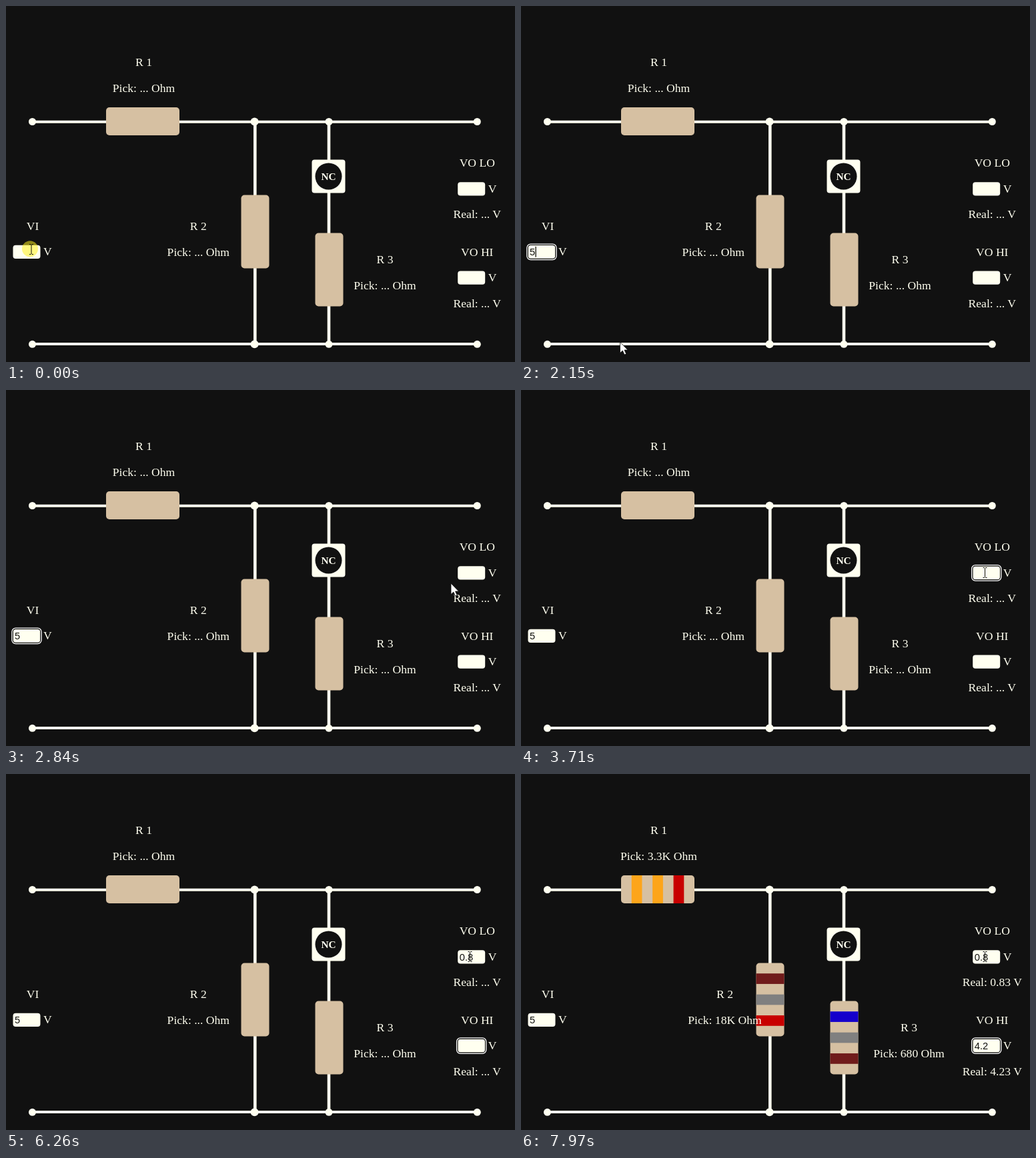
Write an HTML page that moves like this. It is 763 px wide and 534 px high and loops after 8000 ms.

```html
<!DOCTYPE html>
<html lang="en">
<head>
<meta charset="utf-8">
<title>Voltage divider calculator</title>
<style>
html, body { margin: 0; width: 100%; height: 100%; overflow: hidden; background: #111; }
svg { display: block; width: 763px; height: 534px; }
text { font: 17.6px "Liberation Serif", "Times New Roman", serif; fill: #fffff0; }
.mid { text-anchor: middle; }
.nc { font-size: 15.4px; font-weight: bold; text-anchor: middle; }
.val { font: 14.67px "Liberation Sans", Arial, sans-serif; fill: #111; }
</style>
</head>
<body>
<svg id="stage" viewBox="0 0 763 534"></svg>
<script>
const LOOP = 8000, BLINK = 510, IVORY = '#fffff0', TAN = '#d6c0a2';
const green = '#1b7f12', blue = '#1500cc', orange = '#fda51a',
      red = '#c80000', brown = '#701b1b', gray = '#808080';

// time, focused input, values of VI, VO LO, VO HI, index of the result
const states = [
  [0, -1, '', '', '', 0],
  [60, 0, '', '', '', 0],
  [1130, 0, '5', '', '', 0],
  [3200, 1, '5', '', '', 0],
  [4550, 1, '5', '0', '', 0],
  [4960, 1, '5', '0.', '', 0],
  [5060, 1, '5', '0.8', '', 0],
  [5110, 1, '5', '0.8', '', 0],
  [5750, 2, '5', '0.8', '', 0],
  [6770, 2, '5', '0.8', '4', 1],
  [7050, 2, '5', '0.8', '4.', 1],
  [7460, 2, '5', '0.8', '4.2', 2]
];

// cx: label centres of the three resistors
const results = [
  { picks: ['...', '...', '...'], cx: [206.5, 288.3, 568], real: ['...', '...'], bands: [[], [], []] },
  { picks: ['56K', '220K', '12K'], cx: [206.5, 314, 585.5], real: ['0.84', '3.99'],
    bands: [[green, blue, orange], [red, red, orange], [brown, red, red]] },
  { picks: ['3.3K', '18K', '680'], cx: [206.5, 305.5, 581.5], real: ['0.83', '4.23'],
    bands: [[orange, orange, red], [brown, gray, red], [blue, gray, brown]] }
];

const resistors = [
  { x: 150, y: 152, w: 110, h: 42, base: 90 },
  { x: 352.5, y: 283.5, w: 42, h: 110, base: 336 },
  { x: 463.5, y: 340.5, w: 42, h: 110, base: 386 }
];
const inputs = [[10.5, 358.7], [677.2, 264.2], [677.2, 397.5]];

// time, x, y of the pointer
const path = [
  [1840, 38, 365], [1940, 50, 400], [2040, 95, 470], [2140, 148.5, 504], [2290, 270, 478],
  [2440, 455, 405], [2560, 585, 339], [2660, 638, 313], [2840, 667, 290], [3090, 695.5, 274]
];

const rect = (x, y, w, h, r, attrs) =>
  `<rect x="${x}" y="${y}" width="${w}" height="${h}" rx="${r}" ${attrs}/>`;
const fill = c => `fill="${c}"`;
const dot = (x, y, r, c = IVORY) => `<circle cx="${x}" cy="${y}" r="${r}" fill="${c}"/>`;
const text = (x, y, s, cls = 'mid') => `<text x="${x}" y="${y}" class="${cls}">${s}</text>`;

function wires() {
  let s = `<path d="M39.5 173.7H706M39.5 507H706" stroke="${IVORY}" stroke-width="4"/>` +
    `<path d="M373.3 174V507M484 174V507" stroke="${IVORY}" stroke-width="4.6"/>`;
  for (const y of [173.5, 507.3])
    s += dot(39.5, y, 5.5) + dot(372.6, y, 6) + dot(484, y, 5.5) + dot(706.3, y, 5.5);
  return s + rect(458.5, 230.5, 50, 50, 4, fill(IVORY)) + dot(483.5, 255.5, 20, '#111') +
    text(483.5, 261, 'NC', 'nc');
}

function resistor({ x, y, w, h }, bands) {
  const step = 110 / 7;
  return rect(x, y, w, h, 5, fill(TAN)) + bands.map((c, i) => {
    const d = step * (2 * i + 1);
    return w > h ? rect(x + d, y, step, h, 0, fill(c)) : rect(x, y + d, w, step, 0, fill(c));
  }).join('');
}

function ring(x, y, out, color) {
  return rect(x - out, y - out, 41 + 2 * out, 20.3 + 2 * out, 4 + out,
    `fill="none" stroke="${color}" stroke-width="1.3"`);
}

function input(i, value, focused, caret) {
  const [x, y] = inputs[i];
  let s = rect(x, y, 41, 20.3, 4, fill(IVORY));
  if (focused) s += ring(x, y, 0.4, '#111') + ring(x, y, 1.6, '#fff');
  s += text(x + 2.6, y + 15.4, value, 'val');
  if (caret) {
    const width = [...value].reduce((sum, c) => sum + (c === '.' ? 4.08 : 8.16), 0);
    s += rect(x + 2.9 + width, y + 2, 1.2, 16, 0, fill('#000'));
  }
  return s + text(x + 45.6, y + 15.4, 'V', '');
}

function pointerAt(t) {
  const q = Math.floor((t - 40) / 50) * 50 + 40;
  const i = path.findIndex(p => p[0] > q);
  if (i === 0) return path[0].slice(1);
  if (i < 0) return path[path.length - 1].slice(1);
  const a = path[i - 1], b = path[i], k = (q - a[0]) / (b[0] - a[0]);
  return [a[1] + (b[1] - a[1]) * k, a[2] + (b[2] - a[2]) * k];
}

function pointer(t) {
  const [x, y] = pointerAt(t);
  const shape = t < 1890 || t >= 3040
    ? '<path d="M-3 -7.5H-1L0 -6.5L1 -7.5H3M0 -6.5V6.5M-3 7.5H-1L0 6.5L1 7.5H3" fill="none" stroke="#111"/>'
    : '<path d="M0 0V16.5L3.8 13L6.5 19L9.2 17.8L6.6 12H11.6Z" fill="#fff" stroke="#111" stroke-width=".8"/>';
  return `<g transform="translate(${x} ${y})">${shape}</g>`;
}

function scene(t) {
  const [since, focus, vi, lo, hi, n] = states.filter(s => s[0] <= t).pop();
  const res = results[n], blinkOn = (t - since) % (2 * BLINK) < BLINK;
  let s = wires();
  resistors.forEach((r, i) => { s += resistor(r, res.bands[i]); });
  resistors.forEach((r, i) => {
    s += text(res.cx[i], r.base, 'R ' + (i + 1)) +
      text(res.cx[i], r.base + 38.5, `Pick: ${res.picks[i]} Ohm`);
  });
  s += text(40, 336, 'VI');
  ['VO LO', 'VO HI'].forEach((name, i) => {
    const y = 241 + i * 133.5;
    s += text(706.3, y, name) + text(706.3, y + 77, `Real: ${res.real[i]} V`);
  });
  [vi, lo, hi].forEach((v, i) => { s += input(i, v, focus === i, focus === i && blinkOn); });
  const glow = 'rgba(255,240,30,.54)';
  if (t < 140) s += dot(36, 364.2, 12, glow);
  if (t >= 3140 && t < 3300) s += dot(694, 273.5, 12, glow);
  return s + pointer(t);
}

const stage = document.getElementById('stage');
const start = performance.now();
let last = '';
function frame() {
  const next = scene((performance.now() - start) % LOOP);
  if (next !== last) stage.innerHTML = last = next;
  requestAnimationFrame(frame);
}
frame();
</script>
</body>
</html>
```
